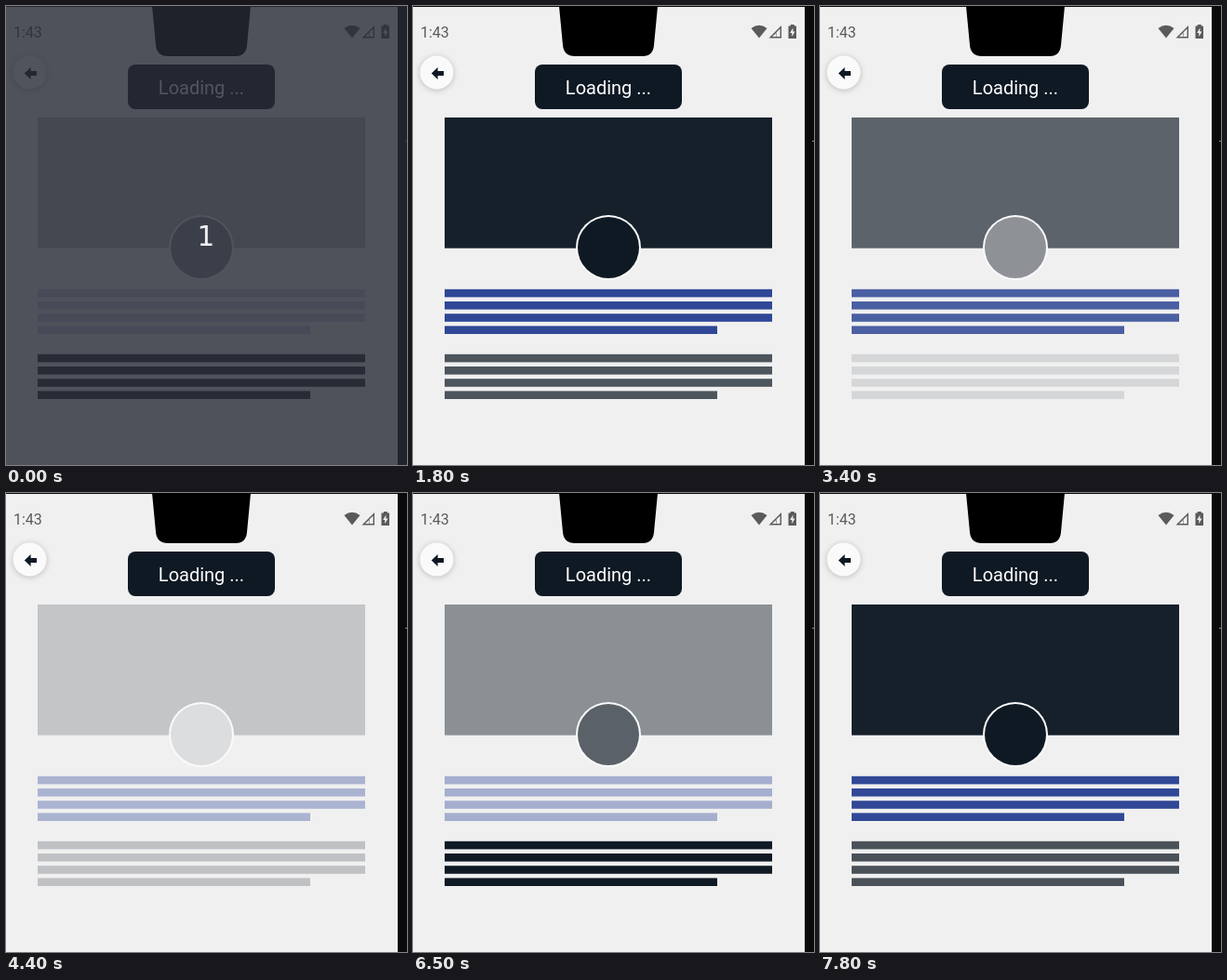
Write an HTML page with a canvas that moves like this. It is 431 px wide and 494 px high and loops after 8000 ms.

```html
<!DOCTYPE html>
<html lang="en">
<head>
<meta charset="utf-8">
<title>Loading placeholder</title>
<style>
  html, body { margin: 0; width: 100%; height: 100%; overflow: hidden; background: #0a0a0a; }
  canvas { display: block; width: 431px; height: 494px; }
</style>
</head>
<body>
<canvas id="stage" width="431" height="494"></canvas>
<script>
const ctx = document.getElementById('stage').getContext('2d');
const LOOP = 8000, PERIOD = 6030;
const BG = '#f0f0f0', INK = '#0f1924', BLUE = '#1d378e', ICON = '#5a5a5a';

// Each placeholder breathes between low and 1, brightest at its own peak time.
const pulse = (t, peak, low) =>
  low + (1 - low) * (1 + Math.cos((t - peak) / PERIOD * Math.PI * 2)) / 2;

function box(x, y, w, h, color) {
  ctx.fillStyle = color;
  ctx.fillRect(x, y, w, h);
}

function disc(x, y, r, color) {
  ctx.fillStyle = color;
  ctx.beginPath();
  ctx.arc(x, y, r, 0, Math.PI * 2);
  ctx.fill();
}

function poly(points, color) {
  ctx.fillStyle = color;
  ctx.beginPath();
  points.forEach(([x, y]) => ctx.lineTo(x, y));
  ctx.closePath();
  ctx.fill();
}

function label(str, x, y, font, color, align = 'center') {
  ctx.font = font;
  ctx.textAlign = align;
  ctx.fillStyle = color;
  ctx.fillText(str, x, y);
}

function withAlpha(a, draw) {
  ctx.save();
  ctx.globalAlpha = a;
  draw();
  ctx.restore();
}

function notch() {
  ctx.fillStyle = '#000';
  ctx.beginPath();
  ctx.moveTo(157, 0);
  ctx.lineTo(161, 42);
  ctx.quadraticCurveTo(162, 54, 174, 54);
  ctx.lineTo(247, 54);
  ctx.quadraticCurveTo(258, 54, 259, 42);
  ctx.lineTo(263, 0);
  ctx.fill();
}

function statusBar() {
  label('1:43', 8, 34, '16px Roboto, sans-serif', ICON, 'left');

  // Wi-Fi
  ctx.fillStyle = ICON;
  ctx.beginPath();
  ctx.moveTo(372, 34.5);
  ctx.lineTo(363.5, 24);
  ctx.quadraticCurveTo(372, 17.6, 380.5, 24);
  ctx.fill();

  // Signal
  poly([[396, 21], [396, 34.5], [382.5, 34.5]], ICON);
  poly([[394.6, 24.4], [394.6, 33.1], [390.5, 33.1], [390.5, 28.5]], BG);
  poly([[390, 29.2], [390, 33.1], [386, 33.1]], BG);

  // Battery
  box(403.5, 21.5, 8.5, 13.5, ICON);
  box(405.8, 20, 4, 2, ICON);
  poly([[408.4, 23.5], [405.2, 29], [407.3, 29], [407.3, 33], [410.5, 27.4], [408.4, 27.4]], BG);
}

function backButton() {
  ctx.save();
  ctx.shadowColor = 'rgba(0, 0, 0, .22)';
  ctx.shadowBlur = 6;
  ctx.shadowOffsetY = 1;
  disc(25.5, 71.5, 18, '#fafafa');
  ctx.restore();
  poly([[19.8, 72.5], [26.6, 66], [26.6, 70], [33, 70], [33, 75], [26.6, 75], [26.6, 79]], INK);
}

function toast() {
  ctx.fillStyle = INK;
  ctx.beginPath();
  ctx.roundRect(131, 63, 158, 48, 8);
  ctx.fill();
  label('Loading ...', 210, 95, '20px Roboto, sans-serif', '#fff');
}

function paragraph(y, color) {
  for (let i = 0; i < 4; i++) {
    box(34, y + i * 13.2, i < 3 ? 352 : 293, 8.6, color);
  }
}

function skeleton(t) {
  withAlpha(pulse(t, 2150, .06), () => box(34, 120, 352, 140.7, INK));
  disc(210, 260, 35, '#fafafa');
  disc(210, 260, 33, BG);
  withAlpha(pulse(t, 1700, .06), () => disc(210, 260, 33, INK));
  withAlpha(pulse(t, 2400, .1), () => paragraph(304.8, BLUE));
  withAlpha(pulse(t, 670, .1), () => paragraph(374.8, INK));
}

function countdown() {
  box(0, 0, 431, 494, 'rgba(39, 43, 54, .8)');
  label('1', 215, 258, '29.5px "DejaVu Sans", sans-serif', '#f0f0f0');
}

function render(t) {
  box(0, 0, 431, 494, '#0a0a0a');
  box(0, 1, 421, 493, BG);
  box(429, 145, 2, 1, '#8a8a8a');
  notch();
  statusBar();
  backButton();
  toast();
  skeleton(t);
  if (t < 100) countdown();
}

let start;
function tick(now) {
  start ??= now;
  render(Math.max(0, now - start) % LOOP);
  requestAnimationFrame(tick);
}
render(0);
requestAnimationFrame(tick);
</script>
</body>
</html>
```
